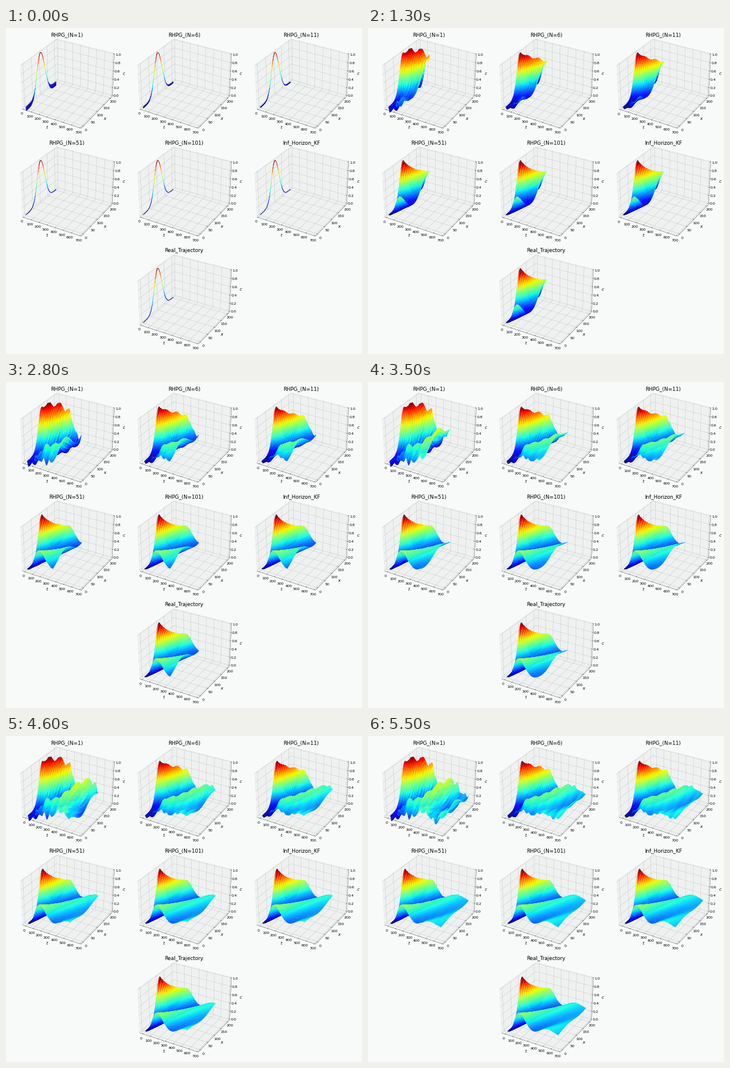
A matplotlib script that plays this animation: 600 by 550 pixels, repeating every 5.6 s.

```python
import numpy as np
import matplotlib.pyplot as plt
from matplotlib.animation import FuncAnimation
from matplotlib.collections import LineCollection, PolyCollection

W, H, DPI = 600, 550, 100
FRAMES, INTERVAL = 56, 100
BG, PANE, GRID = "#f7faf9", "#eef1f0", "#b0b0b0"
T_MAX, X_MIN, X_MAX = 700, -10, 210
LO, HI = -1 / 48, 1 + 1 / 48       # padded box limits
SIDE = 176                         # size of one plot in pixels
TICK_GAP, NAME_GAP = 0.0455, 0.125
TICK_DROP = 2                      # tick text hangs a little low

# title, column, row, error gain, depth of the dent at x = 0
PANELS = [
    ("RHPG_(N=1)", 0, 0, 1.0, 0.50),
    ("RHPG_(N=6)", 1, 0, 0.38, 0.38),
    ("RHPG_(N=11)", 2, 0, 0.28, 0.34),
    ("RHPG_(N=51)", 0, 1, 0.06, 0.0),
    ("RHPG_(N=101)", 1, 1, 0.01, 0.0),
    ("Inf_Horizon_KF", 2, 1, 0.0, 0.0),
    ("Real_Trajectory", 1, 2, 0.0, 0.0),
]
SHIFTS = np.array([(197.5 * col, 182 * row) for _, col, row, _, _ in PANELS])

# camera: elevation 30, azimuth -60
EL, AZ = np.radians(30), np.radians(-60)
EYE = np.array([np.cos(EL) * np.cos(AZ), np.cos(EL) * np.sin(AZ), np.sin(EL)])
RIGHT = np.array([-np.sin(AZ), np.cos(AZ), 0])
UP = np.cross(EYE, RIGHT)
BOX = np.array([4, 4, 3]) / np.sqrt(41) * 1.82946


def project(t, x, z):
    """Map box coordinates (0..1 on each axis) to pixels of the first plot."""
    p = (np.stack(np.broadcast_arrays(t, x, z), axis=-1) - 0.5) * BOX
    depth = 10 - p @ EYE
    fx = (0.095 + p @ RIGHT / depth) / 0.185
    fy = (0.095 + p @ UP / depth) / 0.185
    return np.stack([102.5 + SIDE * (fx - 0.5), 180.3 - SIDE * fy], axis=-1)


def path(*points):
    return project(*np.array(points, float).T)


def everywhere(paths):
    return [p + s for s in SHIFTS for p in paths]


def x_box(x):
    return (x - X_MIN) / (X_MAX - X_MIN)


def concentration(t, x):
    """A pulse that drifts, spreads and wraps around."""
    centre = (100 + 0.55 * t) % 200
    var = 592 + 8.5 * t
    total = sum(np.exp(-(x - centre - 200 * m) ** 2 / (2 * var))
                for m in range(-3, 4))
    return np.sqrt(592 / var) * total


def error(t, x, c, gain, dent):
    flank = -0.12 * np.clip(1 - c / 0.3, 0, 1) * (1 - np.exp(-t / 0.8))
    crest = 0.4 * np.clip(c - 0.3, 0, 0.45)
    swell = 0.15 * np.sin(0.0196 * (t - 0.15 * x))
    ripple = (0.055 * np.sin(0.074 * t + 0.045 * x - 1.55)
              + 0.04 * np.sin(0.11 * t - 0.03 * x + 2))
    hole = np.exp(-(x / 25) ** 2 - ((t - 150) / 80) ** 2)
    slow = 1 - np.exp(-t / 20)
    return gain * (flank + slow * (crest + swell + ripple)) - dent * hole * slow


fig = plt.figure(figsize=(W / DPI, H / DPI), dpi=DPI, facecolor=BG)
ax = fig.add_axes([0, 0, 1, 1])
ax.set_xlim(0, W)
ax.set_ylim(H, 0)
ax.axis("off")


def add_lines(paths, color, order):
    lines = LineCollection(paths, colors=color, linewidths=0.22, zorder=order)
    ax.add_collection(lines)
    return lines


def add_text(pos, text, size, **kw):
    kw = {"ha": "center", "va": "center", **kw}
    return ax.text(*pos, text, fontsize=size, color="black", zorder=6,
                   family="DejaVu Sans", **kw)


# panes and axis lines
panes = [
    path((LO, LO, LO), (HI, LO, LO), (HI, HI, LO), (LO, HI, LO)),
    path((LO, LO, LO), (LO, HI, LO), (LO, HI, HI), (LO, LO, HI)),
    path((LO, HI, LO), (HI, HI, LO), (HI, HI, HI), (LO, HI, HI)),
]
ax.add_collection(PolyCollection(everywhere(panes), facecolors=PANE,
                                 edgecolors="#e3e6e5", linewidths=0.2, zorder=1))
add_lines(everywhere([path((LO, LO, LO), (HI, LO, LO), (HI, HI, LO), (HI, HI, HI))]),
          "black", 3)

# fixed grid and ticks for x and c
x_ticks = np.arange(0, 201, 50)
z_ticks = np.linspace(0, 1, 6)
grid, marks = [], []
IN, OUT = 0.2 / 12, 0.1 / 12
for x in x_box(x_ticks):
    grid.append(path((HI, x, LO), (LO, x, LO), (LO, x, HI)))
    marks.append(path((HI - IN, x, LO), (HI + OUT, x, LO)))
for z in z_ticks:
    grid.append(path((LO, LO, z), (LO, HI, z), (HI, HI, z)))
    marks.append(path((HI - IN, HI, z), (HI + OUT, HI, z)))
add_lines(everywhere(grid), GRID, 2)
add_lines(everywhere(marks), "black", 3)

far, near = HI + TICK_GAP, LO - TICK_GAP
name_far, name_near = HI + NAME_GAP, LO - NAME_GAP
t_ticks = np.arange(0, 701, 100)
t_labels = []
for (title, *_), shift in zip(PANELS, SHIFTS):
    add_text(shift + (102.5, 14.2), title, 6.25, va="baseline")
    for value in x_ticks:
        pos = project(far, x_box(value), near) + shift + (0, TICK_DROP)
        add_text(pos, str(value), 4.5)
    for value in z_ticks:
        pos = project(far, far, value) + shift + (0, TICK_DROP)
        add_text(pos, f"{value:.1f}", 4.5)
    names = [("t", (0.5, name_near, name_near)),
             ("x", (name_far, 0.5, name_near)),
             ("c", (name_far, name_far, 0.5))]
    for name, place in names:
        add_text(project(*place) + shift, name, 5, style="italic")
    t_labels.append([add_text((0, 0), str(v), 4.5) for v in t_ticks])

t_grid = add_lines([], GRID, 2)
t_marks = add_lines([], "black", 3)
surface = PolyCollection([], linewidths=0.2, zorder=5)
ax.add_collection(surface)
jet = plt.get_cmap("jet")


def update(frame):
    end = 1.5 + 11.95 * frame
    low = -0.05 * end

    def t_box(t):
        return (t - low) / (T_MAX - low)

    ticks = t_box(t_ticks)
    t_grid.set_segments(everywhere(
        [path((t, LO, LO), (t, HI, LO), (t, HI, HI)) for t in ticks]))
    t_marks.set_segments(everywhere(
        [path((t, LO + IN, LO), (t, LO - OUT, LO)) for t in ticks]))
    spots = project(ticks, near, near) + (0, TICK_DROP)
    for labels, shift in zip(t_labels, SHIFTS):
        for label, pos in zip(labels, spots + shift):
            label.set_position(pos)

    # rows run from the far side to the near side, so later cells cover earlier
    t = np.linspace(0, end, max(2, round(end / 12)) + 1)[None, :]
    x = np.linspace(200, 0, 61)[:, None]
    real = concentration(t, x)
    cells, colors = [], []
    for (_, _, _, gain, dent), shift in zip(PANELS, SHIFTS):
        c = real + error(t, x, real, gain, dent)
        p = project(t_box(t), x_box(x), c) + shift
        quads = np.stack([p[:-1, :-1], p[1:, :-1], p[1:, 1:], p[:-1, 1:]], axis=2)
        cells.append(quads.reshape(-1, 4, 2))
        mean = (c[:-1, :-1] + c[1:, :-1] + c[1:, 1:] + c[:-1, 1:]).ravel() / 4
        colors.append(jet((mean - mean.min()) / np.ptp(mean)))
    surface.set_verts(np.concatenate(cells))
    surface.set_facecolor(np.concatenate(colors))
    surface.set_edgecolor("face")
    return surface, t_grid, t_marks


anim = FuncAnimation(fig, update, frames=FRAMES, interval=INTERVAL,
                     repeat=True, repeat_delay=0, blit=False)
plt.show()
```
